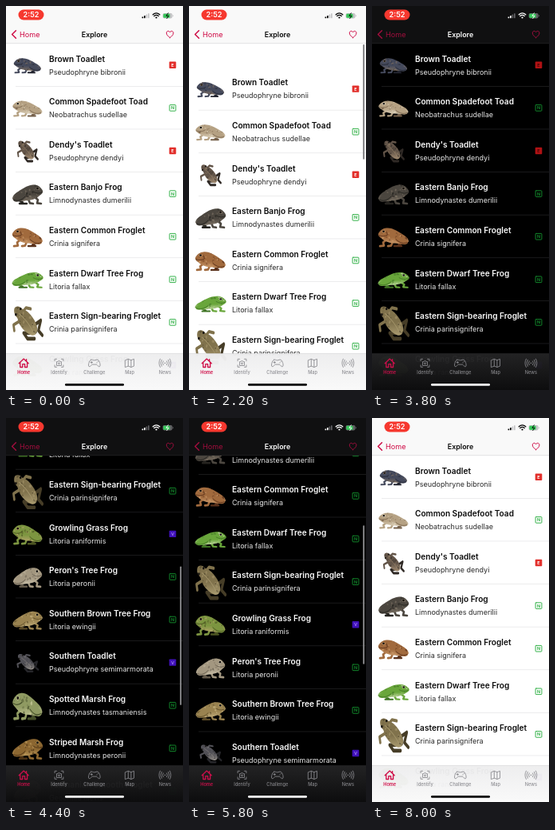
These frames come from a looping animation (222 by 480 pixels, 8.2 s). An HTML page with a canvas:

```html
<!DOCTYPE html>
<html lang="en">
<head>
<meta charset="utf-8">
<title>Explore frogs</title>
<style>
html, body { margin: 0; width: 100%; height: 100%; overflow: hidden; background: #fff; }
canvas { display: block; width: 222px; height: 480px; }
</style>
</head>
<body>
<canvas id="stage"></canvas>
<script>
const W = 222, H = 480, LOOP = 8200, STEP = 200;
const TOP = 47, BOTTOM = 434.5, ROW = 53.6;
const FONT = 'Inter, "Liberation Sans", sans-serif';
const cv = document.getElementById('stage');
const ratio = Math.max(1, window.devicePixelRatio || 1);
cv.width = W * ratio;
cv.height = H * ratio;
const g = cv.getContext('2d');

// Each entry: light colour, dark colour
const palette = {
  bg: ['#ffffff', '#000000'],
  title: ['#0c0c0c', '#fafafa'],
  sub: ['#2a2a2a', '#e6e6e6'],
  line: ['#e4e4e6', '#242426'],
  bar: ['#f9f9f9', '#101011'],
  barLine: ['#d4d4d6', '#262628'],
  tabTop: ['#ededee', '#242425'],
  tabEnd: ['#f9f9f9', '#0d0d0e'],
  tint: ['#cf0a45', '#a00e3d'],
  tabTint: ['#cf0a45', '#cb104b'],
  grey: ['#8f8f94', '#858589'],
  ink: ['#000000', '#ffffff'],
  thumb: ['#7d7d80', '#8a8a8d'],
  weak: ['#c4c4c6', '#606063'],
  red: ['#e22f2b', '#b01214'],
  redInk: ['#ffffff', '#4c0506'],
  green: ['#35b24a', '#12852a'],
  purple: ['#5a1fb0', '#3f10b8'],
  purpleInk: ['#ffffff', '#9a78ee']
};

// name, latin, status, photo: pose, width, height, facing, dark, base, light
const rows = [
  ['Brown Toadlet', 'Pseudophryne bibronii', 'E', ['side', 36, 19, 1, '#22242f', '#454a5c', '#8c7864']],
  ['Common Spadefoot Toad', 'Neobatrachus sudellae', 'N', ['side', 39, 20, 1, '#75604a', '#b5a183', '#e6dcc6']],
  ["Dendy's Toadlet", 'Pseudophryne dendyi', 'E', ['top', 27, 27, 1, '#2f2925', '#625448', '#a08a70']],
  ['Eastern Banjo Frog', 'Limnodynastes dumerilii', 'N', ['side', 40, 25, -1, '#25231f', '#4b463f', '#85796a']],
  ['Eastern Common Froglet', 'Crinia signifera', 'N', ['side', 40, 24, 1, '#59301a', '#a16a3d', '#d6a777']],
  ['Eastern Dwarf Tree Frog', 'Litoria fallax', 'N', ['side', 41, 20, -1, '#3f7424', '#69a63b', '#d9e3bc']],
  ['Eastern Sign-bearing Froglet', 'Crinia parinsignifera', 'N', ['top', 39, 43, 1, '#463d27', '#80724c', '#aa9b70']],
  ['Growling Grass Frog', 'Litoria raniformis', 'V', ['side', 39, 25, 1, '#4d5522', '#7c9540', '#bfa872']],
  ["Peron's Tree Frog", 'Litoria peronii', 'N', ['side', 38, 25, -1, '#62594a', '#a39780', '#d4cbb4']],
  ['Southern Brown Tree Frog', 'Litoria ewingii', 'N', ['side', 39, 23, -1, '#5c4b28', '#9a8350', '#cbb886']],
  ['Southern Toadlet', 'Pseudophryne semimarmorata', 'V', ['top', 28, 23, 1, '#26262a', '#525157', '#8f8a85']],
  ['Spotted Marsh Frog', 'Limnodynastes tasmaniensis', 'N', ['side', 39, 34, 1, '#46502a', '#8f9a62', '#c8c99b']],
  ['Striped Marsh Frog', 'Limnodynastes peronii', 'N', ['side', 40, 26, -1, '#4b3215', '#8c6731', '#c3a062']],
  ['Tasmanian Smooth Froglet', 'Geocrinia laevis', 'N', ['side', 36, 29, -1, '#2a1c18', '#56403a', '#876d5c']],
  ['Victorian Smooth Froglet', 'Geocrinia victoriana', 'N', ['side', 25, 28, 1, '#2b211c', '#584538', '#b9613d']],
  ['Whistling Tree Frog', 'Litoria verreauxii', 'N', ['side', 37, 26, -1, '#51301d', '#94684a', '#c9a27c']]
];
const MAX = rows.length * ROW - (BOTTOM - TOP) - 0.7;

const clamp = v => Math.min(1, Math.max(0, v));
const ramp = (t, a, b) => clamp((t - a) / (b - a));
const ease = p => p * p * (3 - 2 * p);

// Flick back to the top, then a damped bounce past the edge
function flickUp(t, start, edge) {
  if (t < edge) return MAX * (1 - ramp(t, start, edge) ** 1.55);
  const u = t - edge;
  return -900 * u * Math.exp(-u / 0.09);
}

function scrollAt(t) {
  if (t < 1.3) return MAX * ease(ramp(t, 0.1, 1.1));
  if (t < 3.7) return flickUp(t, 1.3, 2.11);
  if (t < 5.2) return MAX * ease(ramp(t, 3.8, 4.8));
  return flickUp(t, 5.2, 6.04);
}

const thumbAlpha = t =>
  ramp(t, 0.05, 0.2) * (1 - ramp(t, 2.9, 3.2)) +
  ramp(t, 3.82, 3.98) * (1 - ramp(t, 6.9, 7.2));

const darkness = t => ramp(t, 2.9, 3.2) * (1 - ramp(t, 6.9, 7.2));

function blend([a, b], m) {
  const part = (s, i) => parseInt(s.substr(i, 2), 16);
  const mix = i => Math.round(part(a, i) + (part(b, i) - part(a, i)) * m);
  return `rgb(${mix(1)},${mix(3)},${mix(5)})`;
}

function text(s, x, y, size, weight, fill, align = 'left') {
  g.font = `${weight} ${size}px ${FONT}`;
  g.textAlign = align;
  g.fillStyle = fill;
  g.fillText(s, x, y);
}

function box(x, y, w, h, r, fill) {
  g.beginPath();
  g.roundRect(x, y, w, h, r);
  g.fillStyle = fill;
  g.fill();
}

function oval(x, y, rx, ry, a, fill) {
  g.beginPath();
  g.ellipse(x, y, rx, ry, a, 0, 7);
  g.fillStyle = fill;
  g.fill();
}

function stroke(d, color, width) {
  g.strokeStyle = color;
  g.lineWidth = width;
  g.lineCap = g.lineJoin = 'round';
  g.stroke(new Path2D(d));
}

function speckle(seed, n, dark, light) {
  const rnd = () => (seed = (seed * 16807) % 2147483647) / 2147483647;
  for (let i = 0; i < n; i++) {
    const x = rnd() * 38 - 19, y = rnd() * 26 - 13, r = 0.4 + rnd() * 0.9;
    g.globalAlpha = 0.25 + rnd() * 0.5;
    oval(x, y, r * 1.4, r, rnd() * 3, rnd() < 0.6 ? dark : light);
  }
  g.globalAlpha = 1;
}

const sideBody = new Path2D('M-19-4C-17-8-13-11-9-11C-3-12 4-8 10-4C15-1 19 2 19 6C16 9 8 9 2 8C-4 8-11 6-15 2C-18 0-20-2-19-4Z');
const topBody = new Path2D('M-17-12C-16-15-10-15-7-12C0-11 9-4 12 3C14 9 10 12 5 11C-3 9-11 3-13-4C-16-6-18-9-17-12Z');

function frog([pose, w, h, face, dark, base, light], y, seed) {
  const side = pose === 'side';
  g.save();
  g.translate(27, y);
  g.scale(face * w / 40, h / (side ? 24 : 30));
  if (side) {
    stroke('M-8 3L-13 7L-12 11L-17 11.5M-1 6L-3 11L-7 11.5', base, 2.6);
    stroke('M14 6L6 10L10 11.5L1 11.5', dark, 2.4);
  } else {
    stroke('M-9-7L-2-13L4-12M-11-1L-18 2L-17 7', base, 2.8);
    stroke('M9 2L17-2L14 7L19 11M5 9L-5 9L0 14L9 14', dark, 3.2);
  }
  const shade = g.createLinearGradient(0, -12, 0, 11);
  shade.addColorStop(0, base);
  shade.addColorStop(0.55, base);
  shade.addColorStop(1, light);
  const body = side ? sideBody : topBody;
  g.fillStyle = shade;
  g.fill(body);
  g.save();
  g.clip(body);
  speckle(seed * 977 + 31, 58, dark, light);
  g.restore();
  if (side) {
    oval(10, 4.5, 8.5, 4.2, 0.35, base);
    stroke('M3 3C8 8 13 9 17 7', dark, 0.9);
    stroke('M-18-2C-14 0-10-1-7-3', dark, 0.9);
    oval(-12.5, -6.8, 2, 1.9, 0, light);
    oval(-12.5, -6.8, 1.4, 1.4, 0, '#15120f');
  } else {
    stroke('M-11-8C-4-4 3 2 8 9', light, 0.7);
    oval(-9, -12, 1.3, 1.2, 0, '#15120f');
    oval(-15, -7, 1.3, 1.2, 0, '#15120f');
  }
  g.restore();
}

function badge(kind, y, c) {
  const x = 204.7, top = y - 4.2;
  if (kind === 'N') {
    g.beginPath();
    g.roundRect(x + 0.4, top + 0.4, 7.8, 7.6, 0.8);
    g.strokeStyle = c.green;
    g.lineWidth = 1;
    g.stroke();
    text('N', 209, y + 2, 5.4, 700, c.green, 'center');
  } else {
    const e = kind === 'E';
    box(x, top, 8.6, 8.4, 0.9, e ? c.red : c.purple);
    text(kind, 209, y + 2, 5.4, 700, e ? c.redInk : c.purpleInk, 'center');
  }
}

function list(scroll, c) {
  rows.forEach(([name, latin, status, photo], i) => {
    const y = TOP + i * ROW - scroll, mid = y + ROW / 2;
    if (y > BOTTOM + 8 || y + ROW < TOP - 8) return;
    frog(photo, mid + 0.4, i + 1);
    text(name, 54, y + 22.6, 10.1, 600, c.title);
    text(latin, 54, y + 38.6, 9, 400, c.sub);
    badge(status, mid, c);
    g.fillStyle = c.line;
    g.fillRect(12, y + ROW - 0.6, W - 12, 0.7);
  });
}

function thumb(scroll, alpha, c) {
  const view = BOTTOM - TOP - 2;
  const full = view * 0.45;
  const len = full + Math.min(0, scroll);
  const y = TOP + 1 + (view - full) * clamp(scroll / MAX);
  g.globalAlpha = clamp(alpha);
  box(218.2, y, 1.9, len, 1, c.thumb);
  g.globalAlpha = 1;
}

function header(c) {
  g.fillStyle = c.bar;
  g.fillRect(0, 0, W, TOP);
  g.fillStyle = c.barLine;
  g.fillRect(0, TOP - 0.5, W, 0.6);
  box(15.5, 4.5, 32, 13, 6.5, '#f6382f');
  text('2:52', 31.5, 14.2, 9.1, 600, '#ffffff', 'center');
  for (let i = 0; i < 4; i++) {
    const h = 1.8 + i * 1.4;
    box(170.5 + i * 2.5, 15.2 - h, 1.7, h, 0.4, i < 2 ? c.ink : c.weak);
  }
  stroke('M184.2 10.8Q188.5 7 192.8 10.8M185.8 12.6Q188.5 10.2 191.2 12.6', c.ink, 1.3);
  oval(188.5, 14.4, 1.1, 1, 0, c.ink);
  box(196.6, 9, 12, 6.4, 1.8, c.weak);
  box(197.3, 9.7, 8.2, 5, 1.2, '#37c85a');
  box(209.1, 11, 0.9, 2.3, 0.5, c.weak);
  stroke('M203.3 8.8L200.9 12.3H204L201.7 15.6', c.ink, 0.9);
  stroke('M12.4 30.8L7.6 35.5L12.4 40.2', c.tint, 1.5);
  text('Home', 17, 38.8, 9.1, 400, c.tint);
  text('Explore', 111, 38.7, 8.9, 600, c.title, 'center');
  stroke('M205.6 39.6C203 37.6 201.3 36 201.3 33.8C201.3 31 204.5 30.5 205.6 32.8C206.7 30.5 209.9 31 209.9 33.8C209.9 36 208.2 37.6 205.6 39.6Z', c.tint, 1);
}

const tabs = [
  ['Home', 'M-6 .4L0-5.2L6 .4M-4.4-.8V5.2H-1.4V1.4H1.4V5.2H4.4V-.8M3.4-4.6V-2.4'],
  ['Identify', 'M-5.4-2.6V-5H-3M3-5H5.4V-2.6M5.4 2.6V5H3M-3 5H-5.4V2.6M-3 2.8V-1.6H-1.4L-.8-2.6H.8L1.4-1.6H3V2.8ZM-1 .6A1 1 0 1 0 1 .6A1 1 0 1 0-1 .6'],
  ['Challenge', 'M-4.4-4C-2.6-4.8-1.8-3.4 0-3.4S2.6-4.8 4.4-4C6.8-2.6 8.2 3.2 6.6 4.4C5 5.2 3.6 1.8 2.4 1.8H-2.4C-3.6 1.8-5 5.2-6.6 4.4C-8.2 3.2-6.8-2.6-4.4-4ZM-3.5-2V.4M-4.7-.8H-2.3M3-.4H3.2M4.4-1.6H4.6'],
  ['Map', 'M-5.4-3.6L-1.8-5L1.8-3.6L5.4-5V3.8L1.8 5.2L-1.8 3.8L-5.4 5.2ZM-1.8-5V3.8M1.8-3.6V5.2'],
  ['News', 'M-2.2-2.4Q-4 0-2.2 2.4M2.2-2.4Q4 0 2.2 2.4M-4.2-4Q-6.6 0-4.2 4M4.2-4Q6.6 0 4.2 4M-6-5.2Q-9 0-6 5.2M6-5.2Q9 0 6 5.2M-.4 0A.4.4 0 1 0 .4 0A.4.4 0 1 0-.4 0']
];

function footer(c) {
  const fill = g.createLinearGradient(0, BOTTOM, 0, H);
  fill.addColorStop(0, c.tabTop);
  fill.addColorStop(1, c.tabEnd);
  g.globalAlpha = 0.97;
  g.fillStyle = fill;
  g.fillRect(0, BOTTOM, W, H - BOTTOM);
  g.globalAlpha = 1;
  g.fillStyle = c.barLine;
  g.fillRect(0, BOTTOM - 0.3, W, 0.6);
  tabs.forEach(([label, icon], i) => {
    const x = 22.2 + i * 44.3, color = i ? c.grey : c.tabTint;
    g.save();
    g.translate(x, 446.3);
    stroke(icon, color, i ? 0.9 : 1.3);
    g.restore();
    text(label, x, 459.8, 5.6, i ? 500 : 600, color, 'center');
  });
  box(74, 472, 74, 2.8, 1.4, c.ink);
}

function draw(t) {
  const m = darkness(t), scroll = scrollAt(t), c = {};
  for (const key in palette) c[key] = blend(palette[key], m);
  g.setTransform(ratio, 0, 0, ratio, 0, 0);
  g.fillStyle = c.bg;
  g.fillRect(0, 0, W, H);
  list(scroll, c);
  thumb(scroll, thumbAlpha(t), c);
  header(c);
  footer(c);
}

let shown = -1;
const begin = performance.now();
function tick() {
  const step = Math.floor(((performance.now() - begin) % LOOP) / STEP);
  if (step !== shown) {
    shown = step;
    draw(step * STEP / 1000);
  }
  requestAnimationFrame(tick);
}
tick();
</script>
</body>
</html>
```
